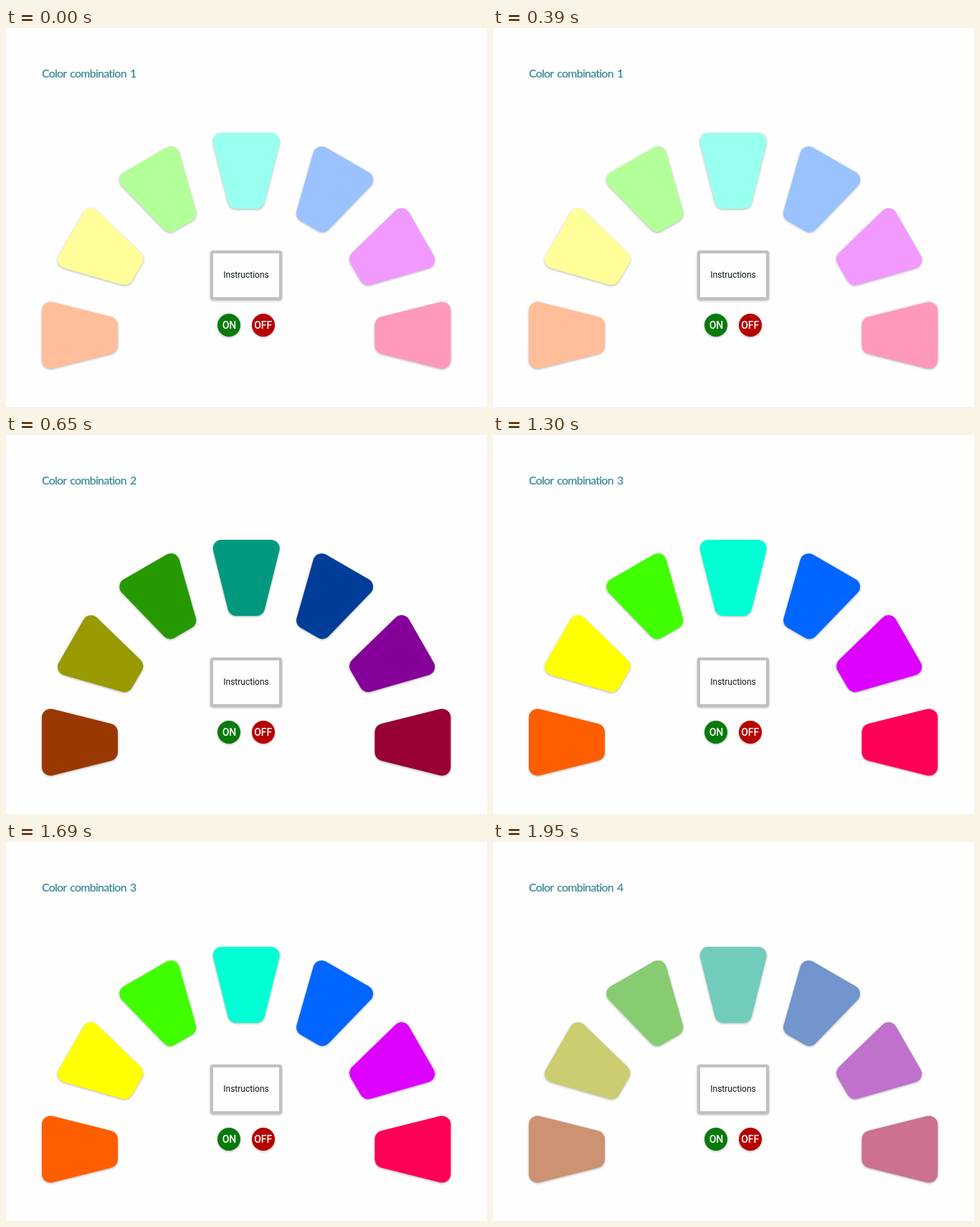
Write an HTML page that moves like this. It is 671 by 528 pixels and loops after 2600 ms.

```html
<!DOCTYPE html>
<html lang="en">
<head>
<meta charset="utf-8">
<title>Color combinations</title>
<style>
  html, body { margin: 0; width: 100%; height: 100%; overflow: hidden; background: #fefefe; }
  svg { display: block; }
  .raised { filter: drop-shadow(0 1.5px 1.5px rgba(0, 0, 0, .3)); }
  .title { font: 500 16px Lato, sans-serif; letter-spacing: -.8px; word-spacing: 2px; fill: #2c8494; }
  .label { font: 12px Roboto, sans-serif; fill: #0c1a0c; text-anchor: middle; }
  .button { font: 500 14px Roboto, sans-serif; fill: #fff; text-anchor: middle; }
</style>
</head>
<body>
<svg width="671" height="528" viewBox="0 0 671 528">
  <text class="title" id="title" x="50" y="69"></text>
  <g id="pads"></g>
  <rect class="raised" x="287" y="312" width="96" height="65" rx="2" fill="#fefefe" stroke="#c0c0c0" stroke-width="4"/>
  <text class="label" x="335" y="348">Instructions</text>
  <circle class="raised" cx="311" cy="414" r="16" fill="#077a0a"/>
  <text class="button" x="311.5" y="419">ON</text>
  <circle class="raised" cx="359" cy="414" r="16" fill="#b60000"/>
  <text class="button" x="358.7" y="419">OFF</text>
</svg>
<script>
const STEP = 650;
const NS = 'http://www.w3.org/2000/svg';
const tones = [[100, 80], [100, 30], [100, 50], [47, 62]]; // saturation, lightness
const hues = [22, 60, 105, 170, 216, 292, 339.5];
const title = document.getElementById('title');
const layer = document.getElementById('pads');

function make(tag, attrs, parent) {
  const el = document.createElementNS(NS, tag);
  for (const key in attrs) el.setAttribute(key, attrs[key]);
  return parent.appendChild(el);
}

// Pads sit on a half ring; the two end pads stand slightly further out.
const pads = hues.map((hue, i) => {
  const deg = (i - 3) * 30;
  const a = deg * Math.PI / 180;
  const r = Math.abs(deg) === 90 ? 232.2 : 229;
  const x = 335.2 + r * Math.sin(a);
  const y = 428 - r * Math.cos(a);
  const group = make('g', { class: 'raised' }, layer);
  return make('path', {
    d: 'M-34.5-41H34.5L14 41H-14Z',
    transform: `translate(${x.toFixed(2)} ${y.toFixed(2)}) rotate(${deg})`,
    'stroke-width': 24,
    'stroke-linejoin': 'round'
  }, group);
});

let shown = -1;
function draw() {
  const step = Math.floor(performance.now() / STEP) % tones.length;
  if (step !== shown) {
    shown = step;
    const [s, l] = tones[step];
    title.textContent = `Color combination ${step + 1}`;
    pads.forEach((pad, i) => {
      const color = `hsl(${hues[i]}, ${s}%, ${l}%)`;
      pad.setAttribute('fill', color);
      pad.setAttribute('stroke', color);
    });
  }
  requestAnimationFrame(draw);
}
draw();
</script>
</body>
</html>
```
